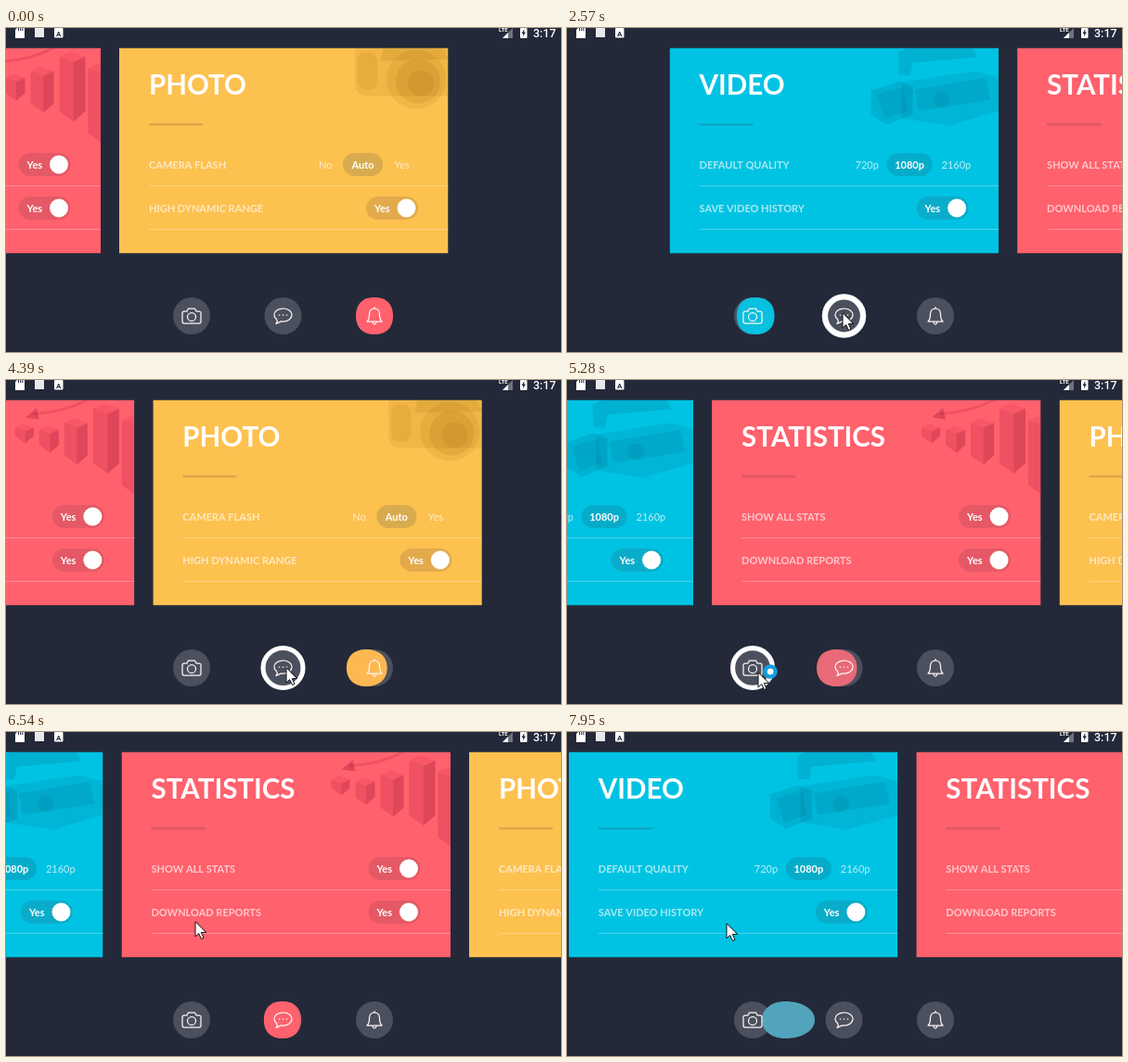
Write an HTML page with a canvas that moves like this. It is 598 px wide and 350 px high and loops after 8 s.

```html
<!DOCTYPE html>
<html lang="en">
<head>
<meta charset="utf-8">
<title>Settings pager</title>
<style>
  html, body { margin: 0; width: 100%; height: 100%; overflow: hidden; background: #232939; }
  canvas { display: block; width: 598px; height: 350px; }
</style>
</head>
<body>
<canvas id="stage"></canvas>
<script>
const W = 598, H = 350, LOOP = 8000;
const CARD = { x: 122, y: 21.5, w: 354.5, h: 222, pitch: 374.5 };
const CYAN = [0, 195, 227], RED = [255, 97, 109], YELLOW = [253, 193, 79];
const TABS = [200, 298.5, 397], TAB_Y = 311, TAB_STEP = 98.5;
const FONT = 'Lato, "Open Sans", sans-serif';

// start, duration, from page, to page, time exponent
const MOVES = [
  [850, 600, 2, 1, .8], [1450, 390, 1, 0, .8],
  [2504, 600, 0, 1, 1], [3288, 600, 1, 2, 1],
  [4270, 600, 2, 1, 1], [5164, 600, 1, 0, 1],
  [6120, 450, 0, 1, .8], [6720, 480, 1, 0, .8], [7770, 600, 0, 1, 1 / 1.25]
];
const TAPS = [[2504, 1], [3288, 2], [4270, 1], [5164, 0]];
// time, x, y
const POINTER = [
  [100, 230, 356], [780, 226, 212], [850, 226, 212], [1080, 306, 203], [1200, 306, 203],
  [1400, 248, 199], [1450, 248, 199], [1640, 324, 197], [2060, 324, 197], [2320, 297, 308],
  [2700, 297, 308], [3180, 384, 310], [3500, 384, 310], [3900, 302, 311], [4400, 302, 311],
  [5000, 206, 316], [5300, 206, 316], [5840, 262, 255], [6040, 262, 255], [6130, 284, 207],
  [6330, 204, 205], [6700, 204, 205], [6950, 296, 204], [7500, 310, 214], [7760, 290, 206],
  [7950, 172, 207]
];

const canvas = document.getElementById('stage');
const g = canvas.getContext('2d');
const dpr = window.devicePixelRatio || 1;
canvas.width = W * dpr;
canvas.height = H * dpr;

const clamp = v => Math.max(0, Math.min(1, v));
const mix = (a, b, k) => a + (b - a) * k;
const sine = k => .5 - .5 * Math.cos(Math.PI * k);
const rgb = c => `rgb(${c.map(Math.round).join()})`;
const white = a => `rgba(255,255,255,${a})`;
const blend = (a, b, k) => a.map((v, i) => mix(v, b[i], k));

function text(s, x, y, size, color, weight = 700, align = 'left', font = FONT) {
  g.font = `${weight} ${size}px ${font}`;
  g.fillStyle = color;
  g.textAlign = align;
  g.fillText(s, x, y);
}

function rect(x, y, w, h, color) {
  g.fillStyle = color;
  g.fillRect(x, y, w, h);
}

function pill(x, y, w, h, color, r = h / 2) {
  g.beginPath();
  g.roundRect(x, y, w, h, r);
  g.fillStyle = color;
  g.fill();
}

function disc(x, y, r, color) {
  g.beginPath();
  g.arc(x, y, r, 0, 7);
  g.fillStyle = color;
  g.fill();
}

function poly(color, ...pts) {
  g.beginPath();
  for (let i = 0; i < pts.length; i += 2) g.lineTo(pts[i], pts[i + 1]);
  g.closePath();
  g.fillStyle = color;
  g.fill();
}

function camcorder() {
  const soft = 'rgba(0,80,115,.12)', deep = 'rgba(0,80,115,.16)';
  poly(soft, 250, 37, 330, 25, 355, 32, 355, 68, 300, 84, 250, 76);
  poly(deep, 217, 46, 247, 36, 262, 42, 262, 72, 234, 83, 217, 72);
  poly(soft, 224, 50, 252, 42, 256, 68, 232, 77);
  poly(deep, 246, 5, 256, 0, 326, 0, 331, 10, 262, 16, 259, 30, 247, 29);
  poly(soft, 264, 45, 340, 32, 346, 56, 268, 68);
  disc(293, 56, 9, soft);
}

function barChart() {
  const front = 'rgba(170,15,50,.20)', side = 'rgba(150,10,45,.31)', top = 'rgba(190,30,60,.13)';
  const bars = [[226, 26, 20, 17], [252, 28, 21, 25], [279, 20, 25, 45], [310, 4, 28, 70], [341, 16, 30, 82]];
  for (const [x, y, w, h] of bars) {
    const m = x + w * .55, d = w * .2;
    poly(front, x, y + d, m, y + d * 2, m, y + h + d, x, y + h - d);
    poly(side, m, y + d * 2, x + w, y + d, x + w, y + h - d, m, y + h + d);
    poly(top, x, y + d, x + w * .4, y, x + w, y + d, m, y + d * 2);
  }
  g.beginPath();
  g.moveTo(247, 15);
  g.quadraticCurveTo(280, 13, 306, -1);
  g.lineWidth = 3;
  g.strokeStyle = front;
  g.stroke();
  poly(side, 237, 19, 249, 9, 252, 21);
}

function photoCamera() {
  const soft = 'rgba(150,95,0,.11)', deep = 'rgba(140,85,0,.13)';
  g.beginPath();
  g.roundRect(254, -10, 120, 62, 12);
  g.fillStyle = soft;
  g.fill();
  poly(deep, 285, 0, 294, -4, 346, -4, 355, 12, 282, 14);
  disc(320, 34, 32, soft);
  disc(322, 36, 24, deep);
  disc(325, 38, 14, soft);
  pill(257, 5, 21, 40, soft, 8);
}

function toggle(y) {
  pill(266, y - 12.5, 56, 25, 'rgba(75,45,55,.15)');
  text('Yes', 275, y + 4, 11, '#fff');
  disc(309.5, y, 10, '#fff');
}

function choice(y, left, leftX, mid, pillX, pillW, right, rightX) {
  pill(pillX, y - 12.5, pillW, 25, 'rgba(30,60,70,.17)');
  text(left, leftX, y + 4, 11, white(.72), 400);
  text(mid, pillX + pillW / 2, y + 4, 11, '#fff', 700, 'center');
  text(right, rightX, y + 4, 11, white(.72), 400);
}

const ROW = [126, 173];
const PAGES = [
  {
    title: 'VIDEO', color: CYAN, art: camcorder, labels: ['DEFAULT QUALITY', 'SAVE VIDEO HISTORY'],
    controls() {
      choice(ROW[0], '720p', 200, '1080p', 234, 49, '2160p', 293);
      toggle(ROW[1]);
    }
  },
  {
    title: 'STATISTICS', color: RED, art: barChart, labels: ['SHOW ALL STATS', 'DOWNLOAD REPORTS'],
    controls() { ROW.forEach(toggle); }
  },
  {
    title: 'PHOTO', color: YELLOW, art: photoCamera, labels: ['CAMERA FLASH', 'HIGH DYNAMIC RANGE'],
    controls() {
      choice(ROW[0], 'No', 215, 'Auto', 241, 43, 'Yes', 296.5);
      toggle(ROW[1]);
    }
  }
];

function card(page, x) {
  if (x > W || x + CARD.w < 0) return;
  g.save();
  g.translate(x, CARD.y);
  g.beginPath();
  g.rect(0, 0, CARD.w, CARD.h);
  g.clip();
  rect(0, 0, CARD.w, CARD.h, rgb(page.color));
  page.art();
  text(page.title, 32, 50.5, 29.5, '#fff', 700);
  rect(32, 81.5, 58, 2.5, 'rgba(60,40,50,.17)');
  page.labels.forEach((s, i) => {
    text(s, 32, ROW[i] + 4, 11, white(.65));
    rect(32, ROW[i] + 22.5, CARD.w, 1, white(.28));
  });
  page.controls();
  g.restore();
}

function statusBar() {
  poly('#fff', 10, 2, 13, -1, 20, -1, 20, 11, 10, 11);
  for (const x of [13, 15.2, 17.4]) rect(x, 0, 1, 3, '#232939');
  rect(31, 0, 10, 10, '#e8e9ec');
  pill(52, 0, 9.5, 10.5, '#fff', 1);
  text('A', 56.7, 8.5, 8, '#232939', 700, 'center', 'Roboto, sans-serif');
  poly(white(.35), 546, 0, 546, 11, 535, 11);
  poly('#fff', 541, 5, 541, 11, 535, 11);
  text('LTE', 531, 4, 6, '#fff', 700, 'left', 'Roboto, sans-serif');
  pill(554, 0, 7.5, 11, '#fff', 1);
  poly('#232939', 558.5, 1, 555.5, 6, 557.3, 6, 556.8, 9.5, 560, 4.5, 558.2, 4.5);
  text('3:17', 568, 10, 12.5, '#fff', 500, 'left', 'Roboto, sans-serif');
}

function icons() {
  g.strokeStyle = '#fff4f2';
  g.lineWidth = 1.25;
  g.lineJoin = g.lineCap = 'round';
  const at = (i, path) => {
    g.save();
    g.translate(TABS[i], TAB_Y);
    g.beginPath();
    path();
    g.stroke();
    g.restore();
  };
  at(0, () => {
    g.moveTo(-8, -5); g.lineTo(-5, -5); g.lineTo(-3.5, -8); g.lineTo(3.5, -8); g.lineTo(5, -5);
    g.lineTo(8, -5); g.quadraticCurveTo(10, -5, 10, -3); g.lineTo(10, 6); g.quadraticCurveTo(10, 8, 8, 8);
    g.lineTo(-8, 8); g.quadraticCurveTo(-10, 8, -10, 6); g.lineTo(-10, -3); g.quadraticCurveTo(-10, -5, -8, -5);
    g.moveTo(4.5, 1); g.arc(0, 1, 4.5, 0, 7);
  });
  at(1, () => {
    g.ellipse(0, -1, 9.5, 7, 0, 2.35, 2.35 + 5.75);
    g.quadraticCurveTo(-2, 6.2, -7.5, 8.5);
    g.quadraticCurveTo(-5.5, 6, -6.7, 4);
    for (const x of [-4, 0, 4]) { g.moveTo(x - .3, -1); g.lineTo(x + .3, -1); }
  });
  at(2, () => {
    g.moveTo(-8, 6); g.quadraticCurveTo(-5.5, 4, -5.5, -2);
    g.bezierCurveTo(-5.5, -10, 5.5, -10, 5.5, -2);
    g.quadraticCurveTo(5.5, 4, 8, 6); g.closePath();
    g.moveTo(-2, 7); g.quadraticCurveTo(0, 11, 2, 7);
    g.moveTo(0, -8); g.lineTo(0, -9.5);
  });
}

function blob(p) {
  const i = Math.min(1, Math.floor(p)), f = p - i, s = Math.sin(Math.PI * clamp(f));
  const left = TABS[i] - 20 + TAB_STEP * (f - .02 * s);
  const right = TABS[i] + 20 + TAB_STEP * (f + .2 * Math.pow(s, 1.5));
  const mid = mix(left, right, .5 - .07 * s);
  const k = .64 - .07 * s, a = mid - left, b = right - mid, r = 20;
  const top = TAB_Y - r, bottom = TAB_Y + r;
  g.beginPath();
  g.moveTo(mid, top);
  g.bezierCurveTo(mid + b * k, top, right, TAB_Y - r * k, right, TAB_Y);
  g.bezierCurveTo(right, TAB_Y + r * k, mid + b * k, bottom, mid, bottom);
  g.bezierCurveTo(mid - a * k, bottom, left, TAB_Y + r * k, left, TAB_Y);
  g.bezierCurveTo(left, TAB_Y - r * k, mid - a * k, top, mid, top);
  // The last tab falls back to red once the pager rests there.
  const color = p === 2 ? RED : blend(PAGES[i].color, PAGES[i + 1].color, f);
  g.fillStyle = rgb(color);
  g.fill();
}

function rings(t) {
  for (const [start, tab] of TAPS) {
    const s = (t - start) / 600;
    if (s < 0 || s >= 1) continue;
    const w = 8 * (1 - s) ** 2, outer = 23.3 + 3.7 * s;
    g.beginPath();
    g.arc(TABS[tab], TAB_Y, outer - w / 2, 0, 7);
    g.lineWidth = w;
    g.strokeStyle = '#fff';
    g.stroke();
  }
}

function pointer(t) {
  if (t < POINTER[0][0]) return;
  let n = POINTER.findIndex(k => k[0] > t);
  if (n < 0) n = POINTER.length - 1;
  const a = POINTER[n - 1], b = POINTER[n];
  const k = sine(clamp((t - a[0]) / (b[0] - a[0])));
  const x = mix(a[1], b[1], k), y = mix(a[2], b[2], k);
  if (t > 5140 && t < 5420) {
    g.beginPath();
    g.arc(x + 13, y - 1, 5.5, 0, 7);
    g.lineWidth = 4.5;
    g.strokeStyle = '#149ce0';
    g.stroke();
    disc(x + 13, y - 1, 3.3, '#fff');
  }
  g.save();
  g.translate(x, y);
  poly('#fff', 0, 0, 0, 16, 3.7, 12.6, 6.5, 18.5, 9, 17.4, 6.3, 11.6, 11.3, 11.4);
  g.lineWidth = 1;
  g.lineJoin = 'miter';
  g.strokeStyle = '#111';
  g.stroke();
  g.restore();
}

function pageAt(t) {
  let p = 2;
  for (const [start, dur, from, to, pow] of MOVES)
    if (t >= start) p = mix(from, to, sine(clamp((t - start) / dur) ** pow));
  return p;
}

function draw(t) {
  const p = pageAt(t);
  g.setTransform(dpr, 0, 0, dpr, 0, 0);
  rect(0, 0, W, H, '#232939');
  statusBar();
  PAGES.forEach((page, i) => card(page, CARD.x + (i - p) * CARD.pitch));
  for (const x of TABS) disc(x, TAB_Y, 20, '#4b505e');
  blob(p);
  icons();
  rings(t);
  pointer(t);
}

const begin = performance.now();
function tick() {
  draw((performance.now() - begin) % LOOP);
  requestAnimationFrame(tick);
}
tick();
</script>
</body>
</html>
```
